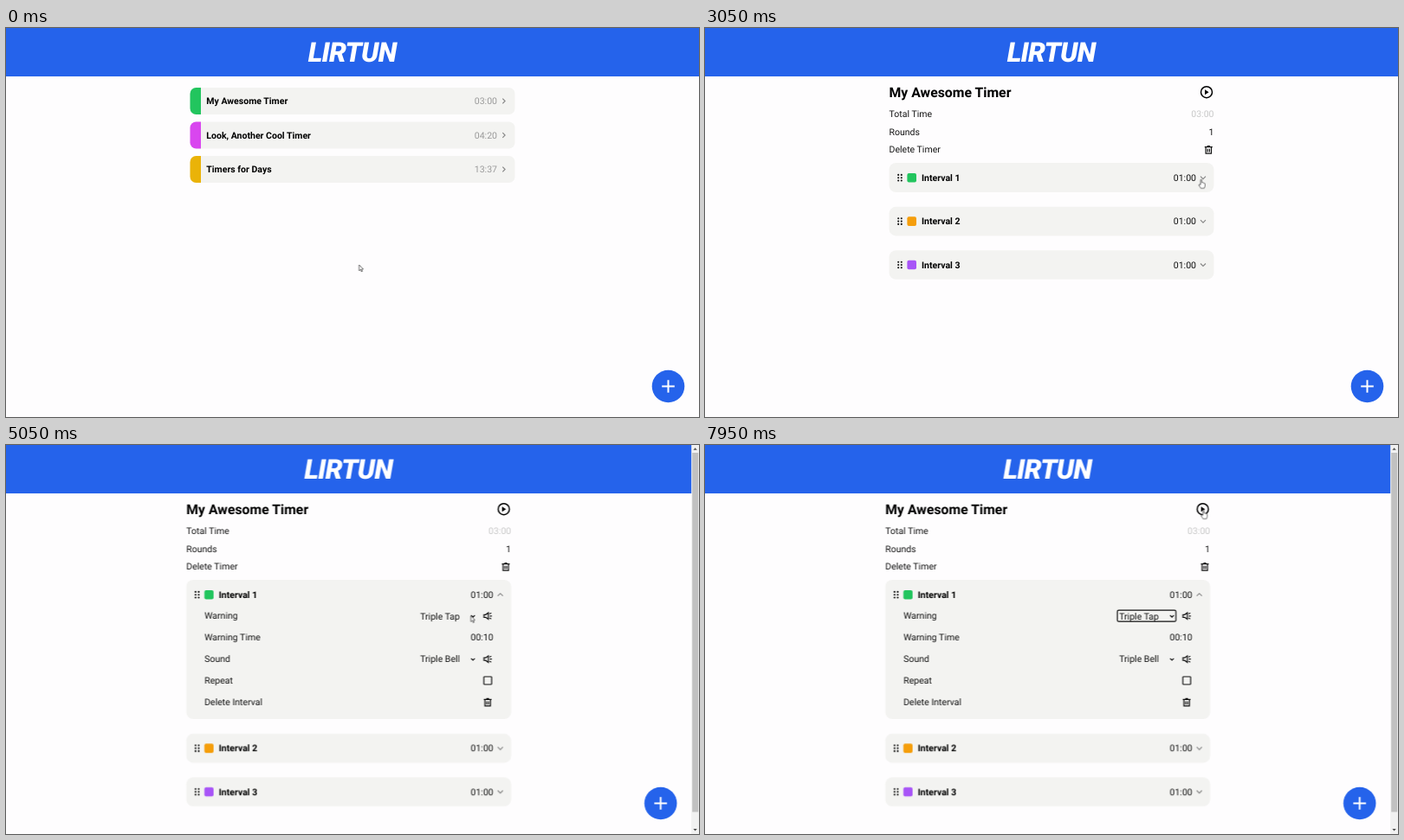
Animation, 800 px wide and 450 px high, one loop 8000 ms. Source, as an HTML page:

```html
<!DOCTYPE html>
<html lang="en">
<head>
<meta charset="utf-8">
<title>Interval timer demo</title>
<style>
  html, body { margin: 0; width: 100%; height: 100%; overflow: hidden; background: #fefdfe; }
  svg { display: block; width: 800px; height: 450px; }
  text { font: 10.54px Roboto, sans-serif; fill: #141414; text-rendering: geometricPrecision; white-space: pre; }
  .bold { font-weight: 700; fill: #000; }
  .title { font-size: 15.8px; font-weight: 700; fill: #000; }
  .logo { font-size: 31.6px; font-weight: 900; font-style: italic; letter-spacing: -.025em; fill: #fff; }
  .muted { fill: #9a9a9a; }
  .faint { fill: #c8c8c8; }
  .white { fill: #fff; }
  .url { font: 6px "Open Sans", sans-serif; fill: #fff; }
  .end { text-anchor: end; }
  .mid { text-anchor: middle; }
  .card { fill: #f3f3f1; }
  .line { fill: none; stroke: #111; stroke-width: 1.2; }
  .chevron { fill: none; stroke: #858585; stroke-width: 1.1; }

  /* Hard state changes */
  .step { animation: 8s step-end infinite; }
  #list { animation-name: list; }
  #detail { animation-name: detail; }
  #closed { animation-name: closed; }
  #open, #scrollbar { animation-name: open; }
  #menu { animation-name: menu; }
  #focus { animation-name: focus; }
  #status { animation-name: status; }
  #page { animation-name: page; }
  #add { animation-name: add; }
  #rest { animation-name: rest; }
  #arrow { animation-name: arrow; }
  #hand { animation-name: hand; }
  @keyframes list { 0% { opacity: 1 } 19.375%, 100% { opacity: 0 } }
  @keyframes detail { 0% { opacity: 0 } 19.375%, 100% { opacity: 1 } }
  @keyframes closed { 0% { opacity: 1 } 44.375%, 100% { opacity: 0 } }
  @keyframes open { 0% { opacity: 0 } 44.375%, 100% { opacity: 1 } }
  @keyframes menu { 0% { opacity: 0 } 64.375% { opacity: 1 } 85%, 100% { opacity: 0 } }
  @keyframes focus { 0% { opacity: 0 } 85%, 100% { opacity: 1 } }
  @keyframes status { 0% { opacity: 0 } 16.875% { opacity: 1 } 25.625%, 100% { opacity: 0 } }
  @keyframes page { 0% { transform: none } 44.375%, 100% { transform: translateX(-4.4px) } }
  @keyframes add { 0% { transform: none } 44.375%, 100% { transform: translateX(-8.8px) } }
  @keyframes rest { 0% { transform: none } 44.375%, 100% { transform: translateY(127.2px) } }
  @keyframes arrow { 0% { opacity: 1 } 13.5% { opacity: 0 } 19.375% { opacity: 1 } 31.25% { opacity: 0 } 55% { opacity: 1 } 98.125%, 100% { opacity: 0 } }
  @keyframes hand { 0% { opacity: 0 } 13.5% { opacity: 1 } 19.375% { opacity: 0 } 31.25% { opacity: 1 } 55% { opacity: 0 } 98.125%, 100% { opacity: 1 } }

  #cursor { animation: cursor 8s ease-in-out infinite; }
  @keyframes cursor {
    0%, .625% { transform: translate(407.6px, 274px) }
    15%, 26.25% { transform: translate(577.2px, 82.8px) }
    32.5%, 53.75% { transform: translate(572.8px, 175.2px) }
    62.5%, 90% { transform: translate(536.6px, 197.6px) }
    98.75%, 100% { transform: translate(575.4px, 75.2px) }
  }
</style>
</head>
<body>
<svg id="stage" viewBox="0 0 800 450">
  <defs>
    <g id="trash">
      <path class="line" d="M-3.2-2.6V4.3H3.2V-2.6M-4.5-3.2H4.5M-1.6-4.2H1.6M-1.1-1V2.8M1.1-1V2.8"/>
    </g>
    <g id="speaker">
      <path class="line" d="M-4.3-1.5H-2.3L.7-3.8V3.8L-2.3 1.5H-4.3ZM2.4 0H4.8M2.2-2.2 4-3.5M2.2 2.2 4 3.5"/>
    </g>
    <path id="grip" d="M-1.8-3.3h0M1.8-3.3h0M-1.8 0h0M1.8 0h0M-1.8 3.3h0M1.8 3.3h0" fill="none" stroke="#111" stroke-width="2.1" stroke-linecap="round"/>
    <path id="down" d="M-3-1.5 0 1.5 3-1.5"/>
  </defs>
</svg>
<script>
  const label = (x, cy, str, cls = "", size = 10.54) =>
    `<text x="${x}" y="${cy + size * .355}" class="${cls}">${str}</text>`;
  const card = (y, h, r = 8) =>
    `<rect class="card" x="212.5" y="${y}" width="375" height="${h}" rx="${r}"/>`;
  const icon = (id, x, y, attrs = "") =>
    `<use href="#${id}" transform="translate(${x} ${y})" ${attrs}/>`;

  const timer = ([name, time, color], i) => {
    const y = 69 + i * 39.5, cy = y + 15.5;
    return card(y, 31, 7) +
      `<path fill="${color}" d="M225 ${y}h-5.5a7 7 0 0 0-7 7v17a7 7 0 0 0 7 7h5.5z"/>` +
      label(231.3, cy, name, "bold") + label(567, cy, time, "muted end") +
      `<path class="chevron" d="M573.3 ${cy - 2.8}l2.8 2.8-2.8 2.8"/>`;
  };

  const interval = (n, cy, color) =>
    icon("grip", 225, cy) +
    `<rect x="233.4" y="${cy - 5.3}" width="10.6" height="10.6" rx="2" fill="${color}"/>` +
    label(250, cy, "Interval " + n, "bold") + label(567, cy, "01:00", "end");

  const select = (cy, value) =>
    label(482.4, cy, value) +
    `<path class="line" d="M541.3 ${cy - .8}l2.1 2.1 2.1-2.1"/>` + icon("speaker", 560.4, cy);

  const timers = [
    ["My Awesome Timer", "03:00", "#22c55e"],
    ["Look, Another Cool Timer", "04:20", "#d946ef"],
    ["Timers for Days", "13:37", "#eab308"]
  ];
  const sounds = ["Alarm", "Beep", "Bell", "Bicycle Bell", "Buzzer", "Cuckoo", "Ding", "Double Ding",
    "Lucky Coin", "Ring Tone", "School Bell", "Comet Ring", "Tap", "Triple Bell", "Triple Tap", "Whistle", "None"];

  const header = `
    <rect width="800" height="56" fill="#2563eb"/>`;

  const detail = `
    ${label(212.5, 74.2, "My Awesome Timer", "title", 15.8)}
    <circle class="line" cx="579" cy="74.2" r="6.5" style="stroke-width:1.5;stroke:#000"/>
    <path d="M577 71.2v6l4.6-3z"/>
    ${label(212.5, 99, "Total Time")}${label(587.5, 99, "03:00", "faint end")}
    ${label(212.5, 119.8, "Rounds")}${label(587.5, 119.8, "1", "end")}
    ${label(212.5, 140.7, "Delete Timer")}${icon("trash", 581.3, 140.8)}
    <g id="closed" class="step">${card(156, 34)}${icon("down", 575, 173.2, 'class="chevron"')}</g>
    <g id="open" class="step">
      ${card(156, 161)}
      <path class="chevron" d="M572 174.7l3-3 3 3"/>
      ${["Warning", "Warning Time", "Sound", "Repeat", "Delete Interval"]
        .map((s, i) => label(233.4, 197.6 + i * 24.95, s)).join("")}
      ${select(197.8, "Triple Tap")}
      ${label(567, 222.6, "00:10", "end")}
      ${select(247.7, "Triple Bell")}
      <rect class="line" x="556" y="268" width="9" height="9" rx=".8"/>
      ${icon("trash", 560.4, 297.5)}
      <rect id="focus" class="step line" x="480.4" y="191.2" width="67.6" height="13" rx="1.5"/>
    </g>
    ${interval(1, 173.2, "#22c55e")}
    <g id="rest" class="step">
      ${[["#f59e0b", 223.6], ["#a855f7", 274]].map(([color, cy], i) =>
        card(cy - 16.8, 33.6) + interval(i + 2, cy, color) + icon("down", 575, cy, 'class="chevron"')).join("")}
    </g>`;

  const scrollbar = `
    <g id="scrollbar" class="step">
      <rect x="791.2" width="8.8" height="450" fill="#f1f1f1"/>
      <rect x="792.2" y="9" width="7" height="415.5" fill="#c1c1c1"/>
      <path d="M793.4 5.8h4.4l-2.2-2.6zM793.4 444h4.4l-2.2 2.6z" fill="#505050"/>
    </g>`;

  const add = `
    <g id="add" class="step">
      <circle cx="764.5" cy="414.5" r="18.8" fill="#2563eb"/>
      <path d="M757.2 414.5h14.6M764.5 407.2v14.6" stroke="#fff" stroke-width="2"/>
    </g>`;

  const menu = `
    <g id="menu" class="step">
      <rect x="477" y="204.7" width="66.4" height="219.8" fill="#f5f5f3" stroke="#8a8a8a" stroke-width=".8"
        style="filter:drop-shadow(0 6px 7px rgba(0,0,0,.25))"/>
      <rect x="477.4" y="385.7" width="65.6" height="12.9" fill="#1b62cf"/>
      ${sounds.map((s, i) => label(479.2, 211.2 + i * 12.92, s, s === "Triple Tap" ? "white" : "")).join("")}
    </g>`;

  const status = `
    <g id="status" class="step">
      <path d="M0 438.6h132a1.5 1.5 0 0 1 1.5 1.5V450H0z"/>
      ${label(2, 444.4, "https://lirtun.vercel.app/timer/1719371052882", "url", 6)}
    </g>`;

  const cursor = `
    <g id="cursor" fill="#fff" stroke="#333" stroke-width=".7" stroke-linejoin="round">
      <path id="arrow" class="step" d="M0 0V6.8L1.6 5.4 2.7 7.9 3.8 7.4 2.7 5H4.8Z"/>
      <path id="hand" class="step" d="M-.8 6.2V.8Q-.8 0 0 0T.8.8V3.8Q1.6 3.2 2.2 4 3 3.6 3.4 4.3 4.4 4.1 4.4 5.2V7.4Q4.2 9 3.4 10.2H-.4Q-1.4 8.6-2.6 7-3 5.8-2 5.6Z"/>
    </g>`;

  document.getElementById("stage").insertAdjacentHTML("beforeend", `
    ${header}
    <g id="page" class="step">
      ${label(399.6, 28, "LIRTUN", "logo mid", 31.6)}
      <g id="list" class="step">${timers.map(timer).join("")}</g>
      <g id="detail" class="step">${detail}</g>
    </g>
    ${scrollbar}${add}${menu}${status}${cursor}`);
</script>
</body>
</html>
```
